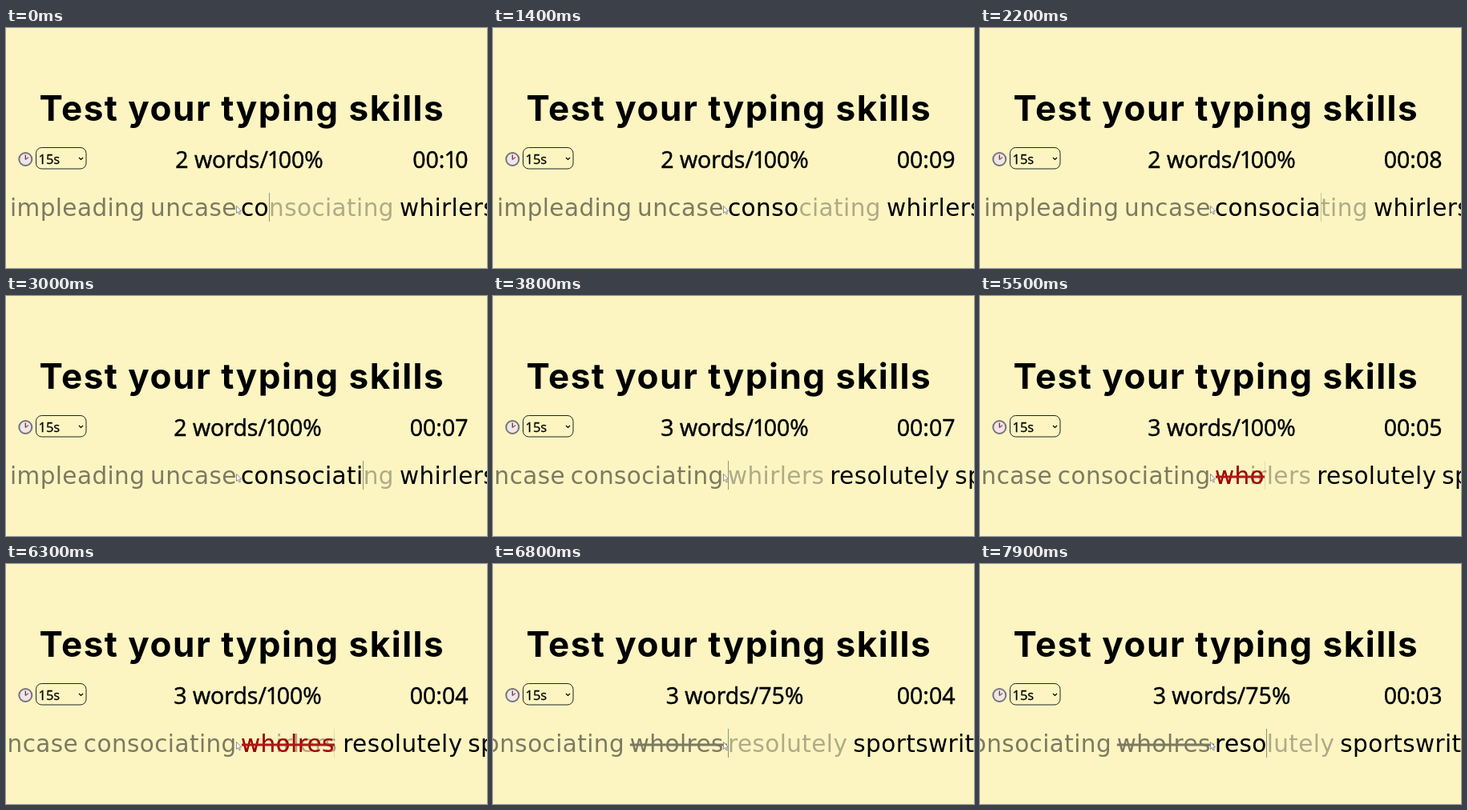
Animation of 600 by 300 pixels, one loop 8000 ms. Source, as an HTML page:

```html
<!DOCTYPE html>
<html lang="en">
<head>
<meta charset="utf-8">
<title>Typing test</title>
<style>
  html, body { margin: 0; height: 100%; overflow: hidden; background: #fcf5c2; }
  svg { display: block; }
  text { white-space: pre; font-optical-sizing: none; }
  .title { font: 700 44px Inter, sans-serif; letter-spacing: 1.5px; }
  .words text { font: 29.5px "DejaVu Sans", sans-serif; letter-spacing: .4px; word-spacing: -3px; }
  .stats, .option { font: 28.5px "Open Sans", sans-serif; stroke: #000; stroke-width: .5px; }
  .option { font-size: 16.5px; stroke-width: .3px; }
</style>
</head>
<body>
<svg width="600" height="300" viewBox="0 0 600 300">
  <text class="title" x="41.5" y="116">Test your typing skills</text>

  <circle cx="24.3" cy="164" r="8" fill="#f0e6e8" stroke="#77737a" stroke-width="2"/>
  <path d="M24.3 158.5V164.5" stroke="#5a3b40" stroke-width="1.3"/>
  <path d="M24.3 164.5L28 161.5" stroke="#b04a50" stroke-width="1.2"/>
  <rect x="37.5" y="149.5" width="62.5" height="26.5" rx="7" fill="none" stroke="#222"/>
  <text class="option" x="40.5" y="170">15s</text>
  <path d="M91 162l2.5 2.5 2.5-2.5" fill="none" stroke="#000" stroke-width="1.2"/>

  <text class="stats" id="score" y="175" text-anchor="middle"></text>
  <text class="stats" id="timer" x="576.5" y="175" text-anchor="end"></text>

  <g class="words">
    <g opacity=".5">
      <text id="done" x="294.5" y="235" text-anchor="end"></text>
      <path id="doneStrike" stroke="#000" stroke-width="3"/>
    </g>
    <text id="word" x="293" y="235" opacity=".3"></text>
    <text id="typed" x="293" y="235"></text>
    <path id="strike" stroke="#b01818" stroke-width="3"/>
    <text id="next" y="235"></text>
  </g>
  <path id="caret" stroke="#000"/>
  <path d="M287.5 222.5v9l2-2 1.5 3.5 1.5-.7-1.5-3.3h2.6z" fill="#fff" stroke="#777" stroke-width=".8"/>
</svg>
<script>
const LOOP = 8000, START = 293;
const $ = id => document.getElementById(id);

// Each stage is one word; keys holds the time of every key press.
const stages = [
  { at: 0, done: 'impleading uncase ', word: 'consociating', typed: 'consociating',
    next: 'whirlers resolutely', score: '2 words/100%',
    keys: [0, 0, 300, 850, 1100, 1700, 1900, 2100, 2250, 2950, 3200, 3500] },
  { at: 3800, done: 'uncase consociating ', word: 'whirlers', typed: 'wholres',
    next: 'resolutely sportswriter', score: '3 words/100%',
    keys: [4100, 4700, 5200, 5600, 5800, 6000, 6200] },
  { at: 6500, done: 'consociating wholres ', word: 'resolutely', typed: 'resolutely',
    next: 'sportswriter', score: '3 words/75%', wrong: 'wholres ',
    keys: [7000, 7200, 7500, 7800] }
];

// The digit 1 is set tighter than the others.
const tighten = s => s.replace(/1(.)/, '<tspan dx="-1">1</tspan><tspan dx="-2.5">$1</tspan>');

function setText(id, text) {
  const el = $(id);
  el.textContent = text;
  return text ? el.getComputedTextLength() : 0;
}

function setStrike(id, from, to) {
  $(id).setAttribute('d', to > from ? `M${from} 226H${to}` : '');
}

function render(t) {
  const s = stages.findLast(stage => t >= stage.at);
  const typed = s.typed.slice(0, s.keys.filter(k => k <= t).length);
  const seconds = 10 - Math.floor((t + 50) / 1000);

  $('score').setAttribute('x', seconds === 10 ? 303.5 : 301.5);
  $('score').innerHTML = tighten(s.score);
  $('timer').innerHTML = tighten('00:' + String(seconds).padStart(2, '0'));

  setText('done', s.done);
  const wrongWidth = s.wrong
    ? $('done').getSubStringLength(s.done.length - s.wrong.length, s.wrong.length) : 0;
  setStrike('doneStrike', 294.5 - wrongWidth, 292);

  const wordEnd = START + setText('word', s.word);
  const caretX = START + setText('typed', typed);
  const bad = !s.word.startsWith(typed);
  $('typed').setAttribute('fill', bad ? '#a00000' : '#000');
  setStrike('strike', START + 1, bad ? caretX : 0);

  $('next').setAttribute('x', wordEnd + 7);
  setText('next', s.next);

  // The caret fades in and out once a second.
  const phase = ((t + 600) % 1000) / 1000;
  const glow = Math.min(1, 1.2 * (1 - Math.abs(2 * phase - 1)));
  $('caret').setAttribute('d', `M${Math.floor(caretX) + .5} 206V242`);
  $('caret').setAttribute('opacity', .42 * glow);
}

function frame(now) {
  render(now % LOOP);
  requestAnimationFrame(frame);
}
render(0);
requestAnimationFrame(frame);
</script>
</body>
</html>
```
